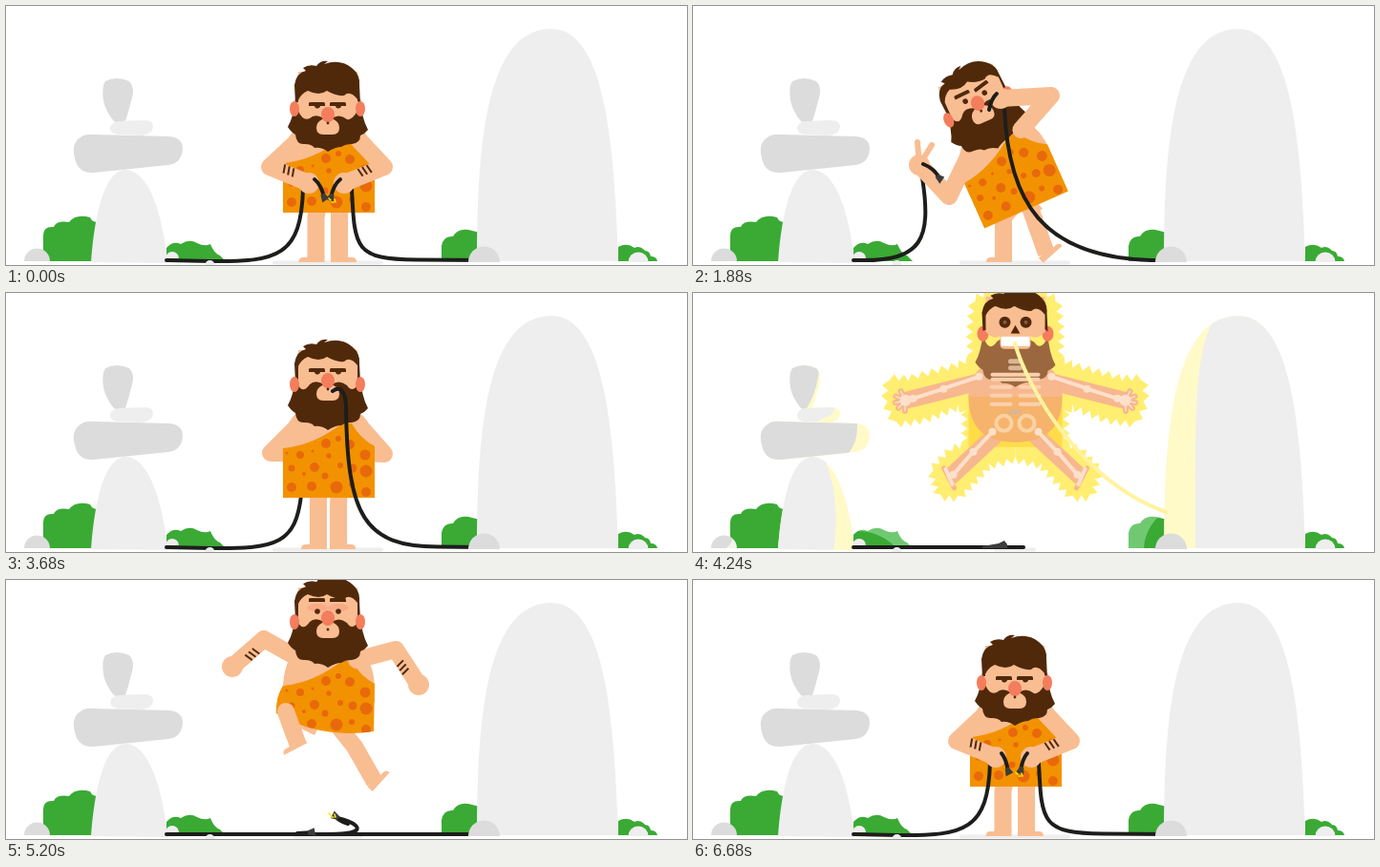
Recreate the animation shown at these times as an HTML page. Size 713 px wide and 272 px high, loop 6.72 s.

```html
<!DOCTYPE html>
<html lang="en">
<head>
<meta charset="utf-8">
<title>Caveman and cables</title>
<style>
html,body{margin:0;width:100%;height:100%;overflow:hidden;background:#fff}
svg{display:block;width:713px;height:272px}
</style>
</head>
<body>
<svg id="stage" viewBox="0 0 713 272" xmlns="http://www.w3.org/2000/svg"></svg>
<script>
const LOOP = 6720, STEP = 40;
const SKIN = '#f9bd92', HAIR = '#50290b', SALMON = '#f37d5c', INK = '#1d1d1b', GREEN = '#3aaa35';
const LIGHT = '#eeeeee', GREY = '#dcdcdc', GLOW = '#fffac8', LEAF = '#70c972', YELLOW = '#ffee70', BONE = '#fde0cb';

const stage = document.getElementById('stage');
const fill = (d, color, more = '') => `<path d="${d}" fill="${color}" ${more}/>`;
const line = (d, color, width, cap = 'round') =>
  `<path d="${d}" fill="none" stroke="${color}" stroke-width="${width}" stroke-linecap="${cap}" stroke-linejoin="round"/>`;
const dot = (x, y, r, color, ry = r) => `<ellipse cx="${x}" cy="${y}" rx="${r}" ry="${ry}" fill="${color}"/>`;
const group = (transform, body) => `<g transform="${transform}">${body}</g>`;
const dome = (x, y, r) => `M${x - r} ${y}A${r} ${r} 0 0 1 ${x + r} ${y}Z`;
const mix = (a, b, k) => typeof a === 'number' ? a + (b - a) * k
  : Array.isArray(a) ? a.map((v, i) => mix(v, b[i], k))
  : Object.fromEntries(Object.keys(a).map(key => [key, mix(a[key], b[key], k)]));
const ramp = (t, from, to) => Math.min(1, Math.max(0, (t - from) / (to - from)));
const smooth = k => k * k * (3 - 2 * k);
const within = (t, from, to) => t >= from && t < to;

// Scenery: outline, colour, then colour of the lit side and the region left in shade
const scenery = [
  ['M39 268V241Q39 231 50 232Q53 225 66 227Q73 218 88 222Q91 229 100 226V268Z', GREEN],
  ['M168 268V254Q175 246 183 250Q192 244 200 249Q208 253 214 250Q218 260 224 262L230 268Z', GREEN,
    LEAF, 'M165 250Q195 248 214 269H165Z'],
  ['M456 268V252Q458 241 468 242Q474 232 488 236L496 238V268Z', GREEN, LEAF, 'M472 270Q472 250 488 234H500V270Z'],
  ['M641 268V253Q650 248 658 254Q664 251 669 257Q674 257 675 263Q681 263 682 268Z', GREEN],
  ['M104 79Q116 73 129 79Q136 86 131 100Q128 112 125 121Q119 125 113 121Q104 110 102 99Q100 85 104 79Z', GREY,
    GLOW, 'M95 70H133Q131 105 117 124H95Z'],
  ['M89 269C92 225 102 172 125 172C151 172 165 225 169 270Z', LIGHT, GLOW, 'M80 170H136Q156 215 147 271H80Z'],
  ['M118 121L145 120Q154 120 154 127Q153 135 142 136L118 135Q109 134 109 128Q110 122 118 121Z', LIGHT,
    GLOW, 'M100 115H147Q151 128 138 131L125 138H100Z'],
  ['M92 135L172 137Q185 139 185 150Q184 165 170 167L92 175Q79 176 74 166Q66 145 78 138Q83 134 92 135Z', GREY,
    GLOW, 'M60 130H171Q175 153 163 168V180H60Z'],
  [dome(32.5, 268, 13.5), GREY, '#f4f4ee', 'M15 250H41Q44 262 33 269H15Z'],
  [dome(174, 265, 7), LIGHT],
  ['M493 268C493 140 504 24 571 24C631 24 637 165 641 268Z', LIGHT, GLOW, 'M526 269C526 120 524 50 552 20H642V269Z'],
  [dome(662, 269, 10.5), LIGHT],
];

const drawScenery = lit => scenery.map(([d, color, glow, shade], i) => lit && shade
  ? `<clipPath id="s${i}">${fill(d, color)}</clipPath>` + fill(d, glow) + fill(shade, color, `clip-path="url(#s${i})"`)
  : fill(d, color)).join('');

// body: hip x, y, lean, nod; arms: elbow, hand; legs: knee, ankle, foot turn;
// cables: path points; tips: start and clip
const holding = {
  body: [338, 217, 0, 1],
  armL: [276, 169, 317, 186], armR: [396, 169, 354, 186],
  legL: [324.5, 222, 324.5, 264, 0], legR: [349, 222, 349, 264, 0],
  cableL: [215, 268, 285, 269, 309, 262, 311, 192],
  cableR: [362, 192, 362, 192, 362, 192, 362, 192, 365, 255, 365, 266, 430, 266.5],
  tipL: [323, 182, 330, 201], tipR: [350, 182, 343, 200],
};
const joined = { ...holding, tipL: [323, 182, 333, 201], tipR: [350, 182, 340, 201] };
const startled = { ...holding, body: [338, 200, 0, 0], armL: [270, 158, 308, 174], armR: [402, 158, 364, 174],
  tipL: [313, 170, 317, 188], tipR: [359, 170, 355, 188] };
const upright = { ...holding, body: [338, 215, 0, 0] };
const biting = {
  body: [349, 214, -24, 0],
  armL: [268, 200, 237, 167], armR: [375, 94, 322, 97],
  legL: [325, 222, 325, 264, 0], legR: [353, 212, 370, 260, -42],
  cableL: [175, 267, 240, 268, 250, 245, 240, 180],
  cableR: [326, 107, 326, 107, 326, 107, 326, 107, 330, 205, 365, 264, 480, 267],
  tipL: [241, 166, 258, 181], tipR: [318, 92, 310, 109],
};
const gripping = { ...biting, armR: [384, 150, 366, 156],
  cableR: [309, 110, 318, 104, 325, 118, 325, 135, 328, 205, 365, 264, 480, 267] };
const reaching = { ...gripping, armL: [287, 188, 294, 252], legR: [357, 216, 374, 264, 0],
  cableL: [268, 268, 281, 268, 285, 266, 286, 258], tipL: [301, 251, 304, 265] };
const ready = { ...upright,
  armL: [277, 168, 302, 168], armR: [396, 169, 374, 168],
  legL: [327, 222, 327, 264, 0], legR: [348, 222, 348, 264, 0],
  cableL: [215, 268, 285, 269, 303, 262, 309, 213],
  cableR: [342, 103, 350, 97, 355, 103, 356, 118, 357, 235, 375, 266, 452, 266.5] };
const leaping = {
  body: [338, 163, 0, 0],
  armL: [270, 62, 237, 91], armR: [408, 73, 432, 110],
  legL: [293, 138, 305, 171, -27], legR: [365, 175, 386, 212, -48],
  cableL: [250, 267, 280, 267, 320, 267, 346, 267],
  cableR: [347, 250, 368, 255, 373, 262, 362, 265, 355, 267, 340, 267, 330, 267],
  tipL: [305, 266, 320, 265], tipR: [358, 256, 345, 248],
};
const landed = { ...leaping, body: [338, 221, 0, 1],
  armL: [272, 172, 278, 206], armR: [402, 172, 396, 206], legL: holding.legL, legR: holding.legR };

const timeline = [
  [0, joined], [480, joined], [660, startled], [800, startled], [1040, upright], [1360, upright],
  [1640, biting], [2080, biting], [2400, gripping], [2720, reaching], [2880, reaching],
  [3360, ready], [4120, ready], [4121, leaping], [5200, leaping], [5440, landed],
  [5680, landed], [6120, holding], [6680, holding], [LOOP, joined],
];

function poseAt(t) {
  const i = timeline.findIndex(([end]) => end > t);
  const [from, a] = timeline[i - 1], [to, b] = timeline[i];
  return mix(a, b, smooth(ramp(t, from, to)));
}

function place([x, y, lean], px, py) {
  const r = lean * Math.PI / 180, c = Math.cos(r), s = Math.sin(r);
  return [x + px * c - py * s, y + px * s + py * c];
}

function drawArm(pose, side, marks) {
  const [ex, ey, hx, hy] = side < 0 ? pose.armL : pose.armR;
  const [sx, sy] = place(pose.body, 29 * side, -79);
  const turn = Math.atan2(hy - ey, hx - ex) * 180 / Math.PI;
  const off = 4 * side;
  const stripes = [-5, 0, 5].map(x => `M${x - 1} ${off - 4.5}L${x + 1} ${off + 4.5}`).join('');
  return line(`M${sx} ${sy}L${ex} ${ey}L${hx} ${hy}`, SKIN, 18) + dot(hx, hy, 11, SKIN) +
    (marks ? group(`translate(${mix(ex, hx, .45)} ${mix(ey, hy, .45)}) rotate(${turn})`, line(stripes, HAIR, 2, 'butt')) : '');
}

function drawLeg(pose, side) {
  const [kx, ky, ax, ay, turn] = side < 0 ? pose.legL : pose.legR;
  const [x, y] = pose.body;
  return line(`M${x + 11 * side} ${y - 8}L${kx} ${ky}L${ax} ${ay}`, SKIN, 18, 'butt') +
    group(`translate(${ax} ${ay}) rotate(${turn}) scale(${side} 1)`, fill('M-9 5V-2H9V0H13Q18 0 18 5Z', SKIN));
}

function drawShin({ legL: [kx, ky, ax, ay] }) {
  return line(`M${kx} ${ky}L${mix(kx, ax, .8)} ${mix(ky, ay, .8)}`, SKIN, 18);
}

function drawTip([x, y, cx, cy], clip) {
  const turn = Math.atan2(cy - y, cx - x) * 180 / Math.PI;
  return line(`M${x} ${y}Q${mix(x, cx, .7)} ${mix(y, cy, .3)} ${cx} ${cy}`, INK, 4) +
    (clip ? group(`translate(${cx} ${cy}) rotate(${turn})`, fill('M-4 -2L3 -4.5L4 4L-4 2Z', '#3c3c3b')) : '');
}

const spots = [[294, 168, 1.5], [308, 170, 4], [321, 166, 1.5], [335, 158, 5], [348, 153, 3], [360, 159, 5],
  [376, 170, 5.5], [338, 171, 2.7], [299, 184, 3.5], [323, 183, 5], [312, 190, 2], [334, 192, 3.5], [350, 181, 3],
  [363, 184, 4.5], [377, 187, 6.5], [299, 204, 5], [320, 203, 5], [346, 204, 6.5], [362, 201, 3], [377, 209, 5]];

const upper = (pose, body) =>
  group(`translate(${pose.body[0]} ${pose.body[1]}) rotate(${pose.body[2]}) translate(-338 -215)`, body);

function drawTorso(pose, leap) {
  const hem = leap ? 'L385 211Q340 218 300 201L283 192Q282 175 290 163' : 'V215H290V163';
  const garment = `M290 163Q322 160 352 137H362Q371 153 386 161${hem}Z`;
  return upper(pose,
    fill('M290 180V165Q291 133 308 124H367Q385 134 386 165V180Z', SKIN) + fill(garment, '#f39200') +
    `<clipPath id="cloth">${fill(garment, '#000')}</clipPath><g clip-path="url(#cloth)">` +
    spots.map(([x, y, r]) => dot(x, y, r, '#e8690b')).join('') + '</g>');
}

const beard = n => `M303 88Q301 108 295 118Q299 124 303 126Q304 137 313 136Q320 136 323 140Q330 139 337 144` +
  `Q345 139 351 139Q355 136 362 136Q371 135 371 127Q376 125 379 121Q372 108 371 88` +
  `L368 ${97 + n / 3}Q362 ${105 + n / 2} 357 ${97 + n}Q350 ${91 + n} 343 ${95 + n}H331` +
  `Q323 ${91 + n} 318 ${96 + n}Q311 ${106 + n / 2} 306 ${97 + n / 3}Z`;
const hair = n => `M303 93L302 74Q304 61 314 59L311 56Q317 52 325 54Q329 48 337 49L333 52` +
  `Q350 46 362 56Q371 63 370 74L371 94L368 91V${76 + n}Q360 ${66 + n} 354 ${72 + n}` +
  `Q346 ${73 + n} 336 ${67 + n}Q328 ${73 + n} 316 ${67 + n}Q309 ${70 + n} 306 ${77 + n}V92Z`;

function drawHead(pose, leap) {
  const nod = pose.body[3], n = 13 * nod, lean = pose.body[2] < -10;
  const awake = lean || leap, browY = leap ? 73 : lean ? 77 : 81;
  const eyes = [326, 348].map(x => awake ? dot(x, 85 + n, 2.8, HAIR)
    : fill(`M${x - 5} ${82 + n}H${x + 3}A3 3 0 0 1 ${x - 3} ${83 + n}Z`, HAIR)).join('');
  const brow = (x, turn) => group(`translate(${x} ${browY + n}) rotate(${turn})`,
    fill('M-8.5 -1Q-8 -2 -7 -2H7Q8.5 -2 8.5 0V2H-8.5Z', HAIR));
  return upper(pose, group(`translate(0 ${7 * nod})`,
    fill('M306 60H368V116H306Z', SKIN) +
    (leap ? dot(326, 81, 11, '#f8aa88', 4) + dot(348, 81, 11, '#f8aa88', 4) : '') +
    fill(beard(n), HAIR) + fill(hair(n), HAIR) +
    [302, 371].map(x => dot(x, 96 + 3 * nod, 5, SALMON, 8)).join('') + eyes +
    brow(325.5, lean ? -2 : 0) + brow(347.5, lean ? -13 : 0) +
    fill(`M331 ${97 + n}H343Q349 ${100 + n} 349 ${106 + n}Q349 ${113 + n} 342 ${113 + n}H332` +
      `Q325 ${113 + n} 325 ${106 + n}Q325 ${100 + n} 331 ${97 + n}Z`, SKIN) +
    dot(337, 92 + n, 7, SALMON, 8) + dot(337, (leap ? 104 : 101) + n, 1.4, HAIR)));
}

const cableLeft = ([x, y, ...c]) => line(`M168 267L${x} ${y}C${c.join(' ')}`, INK, 4);
const cableRight = ([x, y, ...c]) => line(`M${x} ${y}C${c.join(' ')}L500 267`, INK, 4);
const sparks = (x, y) => line(`M${x - 3} ${y - 2}l2 2M${x} ${y + 2}l2 0M${x + 3} ${y - 1}l1 3`, '#ffe600', 1.6);

function drawMan(t, pose) {
  const mouth = within(t, 1440, 4120), back = within(t, 3080, 4120);
  const leap = within(t, 4120, 5400), tucked = within(t, 2240, 4120);
  const lift = leap ? -30 * (1 - ramp(t, 4840, 5200) ** 2) : 0;
  const lifted = body => group(`translate(0 ${lift})`, body);
  const left = drawArm(pose, -1, !back && !within(t, 1440, 2240)), right = drawArm(pose, 1, !mouth);
  const fingers = within(t, 1520, 2120)
    ? line(`M${pose.armL[2]} ${pose.armL[3]}l-2 -24m2 24l13 -21`, SKIN, 6) : '';
  const cl = cableLeft(pose.cableL), cr = cableRight(pose.cableR);
  return (back || leap ? cl : '') + (leap ? cr : '') +
    lifted(drawLeg(pose, -1) + drawLeg(pose, 1) + (back ? left : '') + (tucked ? right : '') + drawTorso(pose, leap)) +
    (back || leap ? '' : cl) + (mouth || leap ? '' : cr) +
    lifted((leap ? drawShin(pose) : '') +
      (back ? '' : left) + fingers + (mouth ? '' : right) + drawHead(pose, leap)) +
    (mouth ? cr : '') + (mouth && !tucked ? right : '') +
    (back ? '' : drawTip(pose.tipL, true)) + (tucked ? '' : drawTip(pose.tipR, !mouth)) +
    (t < 600 || t >= 6640 ? sparks(341, 204) : '') + (within(t, 4840, 5600) ? sparks(341, 247) : '');
}

// Right half of the burst outline, as distance from the axis and height
const burst = [[0, -40], [42, -20], [45, 12], [44, 42], [60, 50], [112, 64], [132, 63], [134, 85], [125, 106],
  [96, 102], [60, 88], [50, 94], [50, 133], [66, 137], [86, 158], [78, 183], [60, 184], [28, 150], [0, 143]];

function spiky(points, flip) {
  let d = '';
  points.slice(1).forEach(([x, y], i) => {
    const [px, py] = points[i], size = Math.hypot(x - px, y - py), n = Math.max(1, Math.round(size / 10));
    const ox = (y - py) / size * 7, oy = -(x - px) / size * 7;
    for (let k = 0; k < n; k++) {
      const tip = (k + .5) / n, end = (k + 1) / n;
      d += `L${flip * (mix(px, x, tip) + ox)} ${mix(py, y, tip) + oy}L${flip * mix(px, x, end)} ${mix(py, y, end)}`;
    }
  });
  return `M0 -40${d}Z`;
}

function skeletonHalf(side) {
  const fan = [-75, -35, 0, 35, 75].map(a => {
    const r = (a + 12) * Math.PI / 180;
    return `M115 84l${11 * Math.cos(r)} ${11 * Math.sin(r)}`;
  }).join('');
  const limbs = line('M28 62L115 84', '#f7b78f', 18) + line(fan, '#f7b78f', 6) +
    line('M12 112L69 165', '#f7b78f', 18, 'butt') + line('M64 176L75 155', '#f7b78f', 5);
  const bones = line('M38 59L74 71M79 73L107 82M25 118L41 135M46 140L65 162M66 172L73 156', BONE, 4) +
    [[38, 59], [75, 72], [107, 82], [24, 117], [44, 138], [65, 162]].map(([x, y]) => dot(x, y, 4, BONE)).join('') +
    line(fan, BONE, 1.5) + dot(115, 84, 6, BONE);
  return { limbs: group(`scale(${side} 1)`, limbs), bones: group(`scale(${side} 1)`, bones) };
}

function drawShock(t) {
  const rise = 82 * (1 - smooth(ramp(t, 4120, 4320)));
  const halves = [-1, 1].map(skeletonHalf);
  const ribs = [70, 79, 88].map(y => `M-25 ${y}H-5M5 ${y}H25`).join('');
  const eye = x => dot(x, 2, 6, HAIR) + dot(x, 2, 2, '#8a5a35');
  const man = fill(spiky(burst, 1), YELLOW) + fill(spiky(burst, -1), YELLOW) +
    fill('M-49 80H49V133H-49Z', '#ffdc48') + halves.map(h => h.limbs).join('') +
    fill('M-49 80Q-47 52 -28 46H28Q47 52 49 80Q49 128 0 128Q-49 128 -49 80Z', '#f6b36c') +
    fill('M-49 80Q-47 52 -28 46H28Q47 52 49 80Z', '#f7b78f') +
    group('translate(-337 -74)', fill(beard(0), '#9b673f')) +
    line(ribs + 'M-24 57H24M-24 62H24', '#fad0ad', 4) + line('M-5 43H5M-5 50H5M-4 96H4', '#d9b696', 5) +
    `<g fill="none" stroke="#fbd2a2" stroke-width="4"><circle cx="-12" cy="108" r="8"/><circle cx="12" cy="108" r="8"/></g>` +
    halves.map(h => h.bones).join('') +
    dot(-34, 14, 6, SALMON, 8) + dot(34, 14, 6, SALMON, 8) +
    fill('M-31 -25H31V12Q22 22 14 15H-14Q-22 22 -31 12Z', SKIN) +
    group('translate(-337 -82)', fill(hair(0), HAIR)) + eye(-11) + eye(11) +
    fill('M0 5L5 14H-5Z', HAIR) + fill('M-16 17Q-16 14 -11 14H11Q16 14 16 18V25Q16 30 11 30H-11Q-16 30 -16 25Z', SKIN) +
    fill('M-14 18H14V26H-14Z', '#fff', 'stroke="#fff" stroke-width="2" stroke-linejoin="round"');
  return cableLeft(leaping.cableL) + fill('M303 266L320 263L326 260L329 264V268H303Z', '#3c3c3b') +
    group(`translate(337.5 ${rise})`, man) +
    line(`M337 ${24 + rise}C350 ${70 + rise} 405 ${188 + rise / 3} 495 230`, '#fff3a0', 4);
}

function render(t) {
  const shock = within(t, 4120, 4840), pose = poseAt(t);
  if (within(t, 3440, 4080)) pose.body[3] += .1 * Math.sin((t - 3680) / 110);
  const height = shock ? 133 : pose.body[1];
  const half = 58 * Math.min(1, Math.max(.38, 1 - (200 - height) / 100));
  stage.innerHTML = drawScenery(shock) +
    line(`M${339 - half} 269.5H${335 + half}`, LIGHT, 4) +
    (shock ? drawShock(t) : drawMan(t, pose)) +
    fill(dome(500.5, 269, 16.5), GREY) + fill(dome(213.5, 272, 5), LIGHT);
}

function tick(now) {
  render(Math.floor((now % LOOP) / STEP) * STEP);
  requestAnimationFrame(tick);
}
render(0);
requestAnimationFrame(tick);
</script>
</body>
</html>
```
